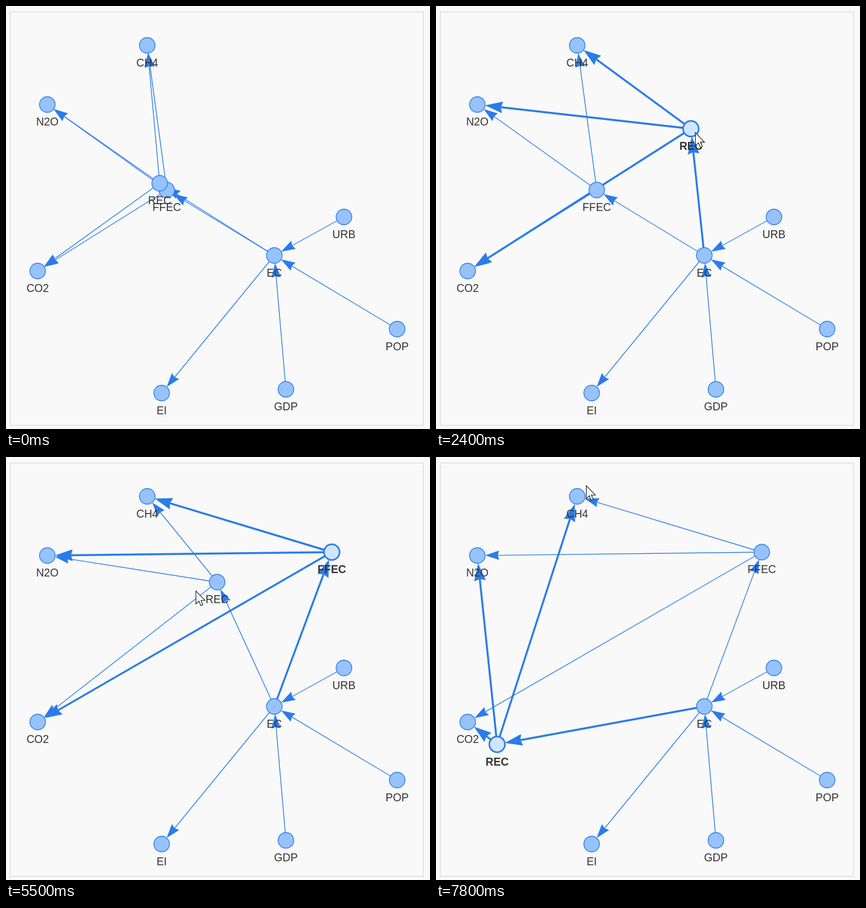
Write an HTML page with a canvas that moves like this. It is 749 by 747 pixels and loops after 8000 ms.

```html
<!DOCTYPE html>
<html lang="en">
<head>
<meta charset="utf-8">
<title>Draggable network</title>
<style>
  html, body { margin: 0; width: 100%; height: 100%; overflow: hidden; background: #f9f9f9; }
  canvas { display: block; }
</style>
</head>
<body>
<canvas id="stage" width="749" height="747"></canvas>
<script>
const ctx = document.getElementById('stage').getContext('2d');
const LOOP = 8000, STEP = 100, SCALE = 1.38, RADIUS = 10 * SCALE;
const BLUE = '#2b7ce9';

const home = {
  CH4: [249, 69], N2O: [72.5, 173.5], CO2: [55.5, 467.5], EI: [274.5, 683],
  GDP: [494, 676.5], POP: [690.5, 570], URB: [596.5, 372], EC: [473.5, 440],
  FFEC: [283.5, 324.5], REC: [271, 312.5]
};
const edges = ['URB EC', 'POP EC', 'GDP EC', 'EC EI', 'EC FFEC', 'EC REC',
  'FFEC CO2', 'FFEC N2O', 'FFEC CH4', 'REC CO2', 'REC N2O', 'REC CH4']
  .map(pair => pair.split(' '));

// A drag moves its node to the given point and carries the cursor along.
const pointer = (start, end, x, y) => ({ start, end, to: [x, y] });
const drag = (node, start, end, x, y) => ({ node, start, end, to: [x, y] });
const ENTRY = { time: 200, at: [642, 109] };
const moves = [
  pointer(200, 900, 287, 316),
  pointer(1000, 1400, 285, 305),
  pointer(1400, 1600, 279, 319.5),
  drag('REC', 1600, 2500, 452, 215),
  drag('REC', 2700, 3100, 372.5, 220.5),
  pointer(3200, 3900, 283.5, 305.5),
  drag('FFEC', 4100, 4300, 458.5, 156),
  drag('FFEC', 4300, 5000, 575, 167.5),
  pointer(5000, 5500, 335, 236),
  pointer(5500, 5800, 356, 219.5),
  drag('REC', 6000, 7020, 107.5, 507),
  pointer(7100, 7800, 265, 50)
];

const easeOut = k => 1 - (1 - k) ** 2;

function sceneAt(time) {
  const nodes = { ...home };
  let cursor = ENTRY.at, selected = null;
  for (const { node, start, end, to } of moves) {
    if (time < start) break;
    const k = easeOut(Math.min(1, (time - start) / (end - start)));
    const from = node ? nodes[node] : cursor;
    const shift = point => point.map((v, i) => v + (to[i] - from[i]) * k);
    cursor = shift(cursor);
    if (node) {
      nodes[node] = shift(from);
      selected = node;
    }
  }
  return { nodes, cursor, selected };
}

function polygon(points) {
  ctx.beginPath();
  points.forEach(([x, y]) => ctx.lineTo(x, y));
  ctx.closePath();
}

function drawEdge([x0, y0], [x1, y1], width) {
  const length = (15 + 3 * width) * SCALE;
  const tip = Math.hypot(x1 - x0, y1 - y0) - RADIUS;
  const tail = tip - length, notch = tip - length * 0.9;
  ctx.save();
  ctx.translate(x0, y0);
  ctx.rotate(Math.atan2(y1 - y0, x1 - x0));
  ctx.lineWidth = width * SCALE;
  ctx.strokeStyle = ctx.fillStyle = BLUE;
  ctx.beginPath();
  ctx.moveTo(0, 0);
  ctx.lineTo(notch, 0);
  ctx.stroke();
  polygon([[tip, 0], [tail, length / 3], [notch, 0], [tail, -length / 3]]);
  ctx.fill();
  ctx.restore();
}

function drawNode(name, [x, y], active) {
  ctx.beginPath();
  ctx.arc(x, y, RADIUS, 0, Math.PI * 2);
  ctx.fillStyle = active ? '#d2e5ff' : '#97c2fc';
  ctx.fill();
  ctx.strokeStyle = BLUE;
  ctx.lineWidth = (active ? 2 : 1) * SCALE;
  ctx.stroke();
  ctx.font = `${active ? 'bold ' : ''}${14 * SCALE}px Arial, "Liberation Sans", sans-serif`;
  ctx.textAlign = 'center';
  ctx.fillStyle = '#343434';
  ctx.fillText(name, x, y + 37);
}

function drawCursor([x, y]) {
  ctx.save();
  ctx.translate(x, y);
  polygon([[0, 0], [0, 23], [5.3, 18], [8.8, 26], [12.3, 24.5], [9, 16.7], [16, 16.7]]);
  ctx.fillStyle = '#fff';
  ctx.fill();
  ctx.strokeStyle = '#111';
  ctx.lineWidth = 1.1;
  ctx.stroke();
  ctx.restore();
}

function draw(time) {
  const { nodes, cursor, selected } = sceneAt(time);
  ctx.fillStyle = '#f9f9f9';
  ctx.fillRect(0, 0, 749, 747);
  ctx.strokeStyle = '#d3d3d3';
  ctx.lineWidth = 1;
  ctx.strokeRect(7.5, 10.5, 730, 730);

  ctx.save();
  ctx.translate(0.5, 0.5);
  for (const pair of edges)
    drawEdge(nodes[pair[0]], nodes[pair[1]], pair.includes(selected) ? 2.5 : 1);
  for (const name in nodes)
    if (name !== selected) drawNode(name, nodes[name], false);
  if (selected) drawNode(selected, nodes[selected], true);
  if (time >= ENTRY.time) drawCursor(cursor);
  ctx.restore();
}

const start = performance.now();
function tick() {
  const elapsed = (performance.now() - start) % LOOP;
  draw(Math.floor(elapsed / STEP) * STEP);
  requestAnimationFrame(tick);
}
tick();
</script>
</body>
</html>
```
